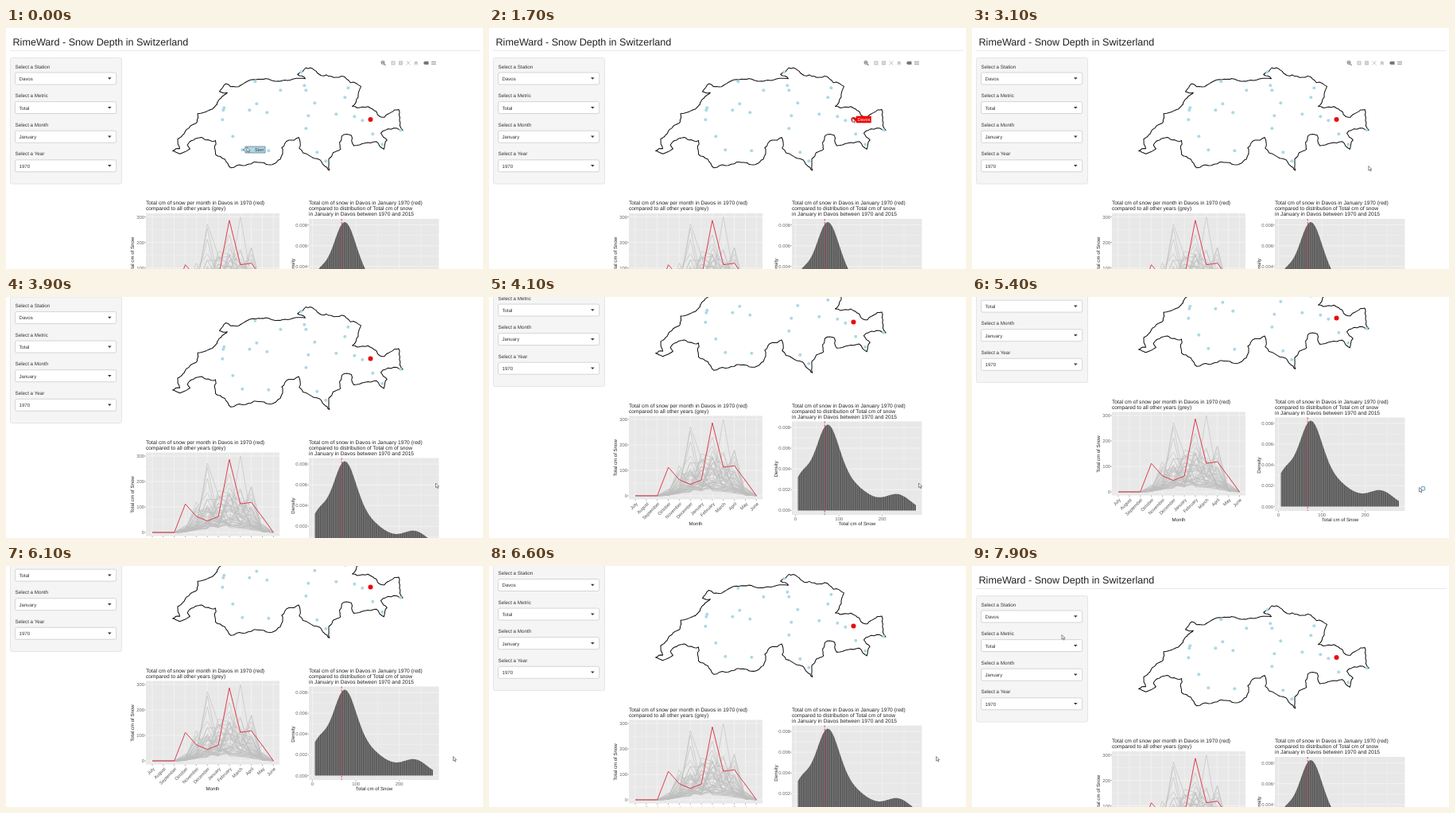
These frames come from a looping animation (600 by 303 pixels, 8 s). An HTML page:

```html
<!DOCTYPE html>
<html lang="en">
<head>
<meta charset="utf-8">
<title>Snow depth dashboard</title>
<style>
html, body { margin: 0; width: 100%; height: 100%; overflow: hidden; background: #fff; }
svg {
  display: block; width: 100vw; height: 100vh;
  font-family: "Liberation Sans", Arial, sans-serif; text-rendering: geometricPrecision;
}
</style>
</head>
<body>
<svg id="stage" viewBox="0 0 600 303">
  <defs>
    <pattern id="bars" width="2.7" height="10" patternUnits="userSpaceOnUse">
      <rect width="2.7" height="10" fill="#5b5b5b"/>
      <rect width=".7" height="10" fill="#858585"/>
    </pattern>
    <clipPath id="leftPanel"><rect x="176" y="233" width="168" height="105"/></clipPath>
  </defs>
  <g id="page"></g>
  <g id="cursor">
    <path d="M0 0V5.6L1.4 4.4 2.4 6.6 3.3 6.2 2.4 4.1H4.1Z" fill="#fff" stroke="#444" stroke-width=".6"/>
    <circle id="busy" cx="4.8" cy="1.2" r="2.4" fill="none" stroke="#6fa8c4" stroke-width="1.1"/>
  </g>
</svg>
<script>
const page = document.getElementById('page');
const cursor = document.getElementById('cursor');
const busy = document.getElementById('busy');

function add(tag, attrs, parent = page) {
  const el = document.createElementNS('http://www.w3.org/2000/svg', tag);
  for (const k in attrs) el.setAttribute(k, attrs[k]);
  parent.appendChild(el);
  return el;
}
const rect = (x, y, width, height, fill, more, parent) =>
  add('rect', { x, y, width, height, fill, ...more }, parent);
const path = (d, stroke, width, more, parent) =>
  add('path', { d, stroke, 'stroke-width': width, fill: 'none', ...more }, parent);
const circle = (cx, cy, r, fill) => add('circle', { cx, cy, r, fill });
function text(str, x, y, size, fill = '#222', more = {}, parent = page) {
  add('text', { x, y, 'font-size': size, fill, ...more }, parent).textContent = str;
}
const middle = { 'text-anchor': 'middle' }, end = { 'text-anchor': 'end' };
const upright = (str, x, y) =>
  text(str, 0, 0, 6.1, '#222', { ...middle, transform: `translate(${x} ${y}) rotate(-90)` });
const lines = (x, rows) => rows.forEach((row, i) => text(row, x, 222.2 + 7 * i, 6.68));

let seed = 7;
const random = () => (seed = seed * 16807 % 2147483647) / 2147483647;

// Header and sidebar
text('RimeWard - Snow Depth in Switzerland', 8.5, 21.5, 12.6, '#222');
path('M5 28.5H597', '#eaeaea', 1);
rect(5.5, 37.5, 140, 158.5, '#f5f5f5', { rx: 2, stroke: '#e0e0e0', 'stroke-width': .8 });
[['Station', 'Davos'], ['Metric', 'Total'], ['Month', 'January'], ['Year', '1970']].forEach(([name, value], i) => {
  const y = 36.6 * i;
  text('Select a ' + name, 11.5, 50.6 + y, 6.25, '#333');
  rect(11.5, 56 + y, 127.2, 15, '#fff', { rx: 2, stroke: '#ccc', 'stroke-width': .8 });
  text(value, 16.5, 65.9 + y, 6.1, '#333');
  add('path', { d: `M128 ${62.3 + y}h4.6l-2.3 2.5z`, fill: '#333' });
});

// Map: key border points (longitude, latitude), roughened between them
const border = `5.96 46.2,6.1 46.24,6.06 46.43,6.44 46.76,6.45 46.92,6.85 47.16,7.03 47.33,6.88 47.35,7 47.5,7.2 47.44,
  7.59 47.58,8.1 47.56,8.56 47.6,8.41 47.68,8.57 47.81,8.87 47.66,9.27 47.65,9.65 47.45,9.48 47.06,9.88 47.01,
  10.11 46.85,10.39 47,10.47 46.6,10.24 46.62,10.04 46.54,10.16 46.41,10.1 46.23,9.95 46.38,9.51 46.3,9.46 46.5,
  9.28 46.49,9.25 46.23,9.02 46.04,9.03 45.82,8.84 46.03,8.44 46.25,8.43 46.46,8.1 46.26,8.1 46.11,7.87 45.93,
  7.55 45.98,7.1 45.87,6.8 46.13,6.8 46.4,6.52 46.46,6.25 46.31,6.3 46.24,6.1 46.14`
  .split(',').map(p => p.trim().split(' ')).map(([lon, lat]) => [209.3 + (lon - 5.956) * 64.2, 179 - (lat - 45.82) * 64.8]);

function roughen(a, b) {
  const dx = b[0] - a[0], dy = b[1] - a[1];
  if (Math.hypot(dx, dy) < 4) return [a];
  const k = (random() - .5) * .3;
  const mid = [(a[0] + b[0]) / 2 - dy * k, (a[1] + b[1]) / 2 + dx * k];
  return [...roughen(a, mid), ...roughen(mid, b)];
}
const outline = border.flatMap((p, i) => roughen(p, border[(i + 1) % border.length]));
path('M' + outline.map(p => p.map(v => v.toFixed(1)).join(' ')).join('L') + 'Z', '#111', 1.05, { 'stroke-linejoin': 'round' });

const stations = `375 72,377 78,345 78,315 95,306 103,328 106,274 100,273 103,272 115,285 136,297 153,330 154,388 94,
  380 110,377 126,415 108,430 75,426 87,438 111,448 116,461 133,473 146,496 128,391 156,402 167,313 67,371 55`;
stations.split(',').forEach(p => circle(...p.trim().split(' ').map(v => +v + .3), 2, '#add8e6'));
circle(458.5, 115, 3, '#e80c0c');

function tooltip(x, y, w, label, fill, ink, edge, textX) {
  const g = add('g', {});
  add('path', { d: `M${x - 3} ${y}l3 -2v-2h${w}v8h${-w}v-2z`, fill, stroke: edge, 'stroke-width': .6 }, g);
  text(label, textX, y + 2.1, 5.7, ink, {}, g);
  return g;
}
const sionTip = tooltip(301, 153, 25, 'Sion', '#add8e6', '#333', '#456', 313);
const davosTip = tooltip(462, 115, 18.5, 'Davos', '#f00000', '#fff', '#f00000', 463.4);

// Map toolbar
const tools = add('g', {});
add('circle', { cx: 474, cy: 43.5, r: 1.9, fill: 'none', stroke: '#888', 'stroke-width': 1.2 }, tools);
path('M475.5 45l2 2M473 43.5h2', '#888', 1.1, {}, tools);
for (const x of [484.5, 494]) rect(x, 41.5, 5, 5, '#c4c4c4', {}, tools);
path('M485.5 44h3M487 42.5v3M495 44h3', '#fff', .8, {}, tools);
path('M503.5 41.5l5 5M508.5 41.5l-5 5', '#c4c4c4', .9, {}, tools);
add('path', { d: 'M513 44l2.8-2.7 2.8 2.7h-.8v2.6h-1.4v-1.8h-1.2v1.8h-1.4v-2.6z', fill: '#c4c4c4' }, tools);
add('path', { d: 'M525 44l1.5-2h5v4h-5z', fill: '#777' }, tools);
path('M535 42.6h6M535 45.3h6', '#b4b4b4', 1.7, {}, tools);

// Monthly line chart
const grid = (d, major) => path(d, '#f7f7f7', major ? .7 : .35);
const monthX = m => 184 + 13.85 * m;
const snowY = v => 333.5 - .32 * v;
const series = (values, color, width) =>
  path('M' + values.map((v, m) => `${monthX(m).toFixed(1)} ${snowY(v).toFixed(1)}`).join('L'), color, width,
    { 'clip-path': 'url(#leftPanel)', 'stroke-linejoin': 'round' });

lines(176, ['Total cm of snow per month in Davos in 1970 (red)', 'compared to all other years (grey)']);
rect(176, 233, 168, 105, '#e8e8e8');
for (let v = 0; v <= 300; v += 50) grid(`M176 ${snowY(v)}H344`, v % 100 == 0);
'July August September October November December January February March April May June'.split(' ').forEach((name, m) => {
  grid(`M${monthX(m)} 233V338`, true);
  path(`M${monthX(m)} 338v1.5`, '#555', .5);
  text(name, 0, 0, 5.7, '#4d4d4d', { ...end, transform: `translate(${monthX(m) + 3.2} 344) rotate(-45)` });
});
for (let v = 0; v <= 300; v += 100) {
  text(v, 174, snowY(v) + 2, 5.9, '#666', end);
  path(`M174.5 ${snowY(v)}H176`, '#555', .5);
}
// Winter bell over the months with a long-tailed spread between years
const typical = m => 105 * Math.exp(-(((m - 6.6) / 2.9) ** 4));
for (let year = 0; year < 45; year++) {
  const values = Array.from({ length: 12 }, (_, m) => Math.min(300, typical(m) * (.15 - .58 * Math.log(random()))));
  series(values, '#bebebe', .6);
}
series([0, 0, 0, 112, 63, 45, 62, 287, 112, 118, 60, 0], '#dc3545', .95);
upright('Total cm of Snow', 161, 286);
text('Month', 260, 370.2, 6.1, '#222', middle);

// Density chart: a sum of bells
lines(381, ['Total cm of snow in Davos in January 1970 (red)', 'compared to distribution of Total cm of snow',
  'in January in Davos between 1970 and 2015']);
rect(381, 240, 163.5, 117.5, '#e8e8e8');
for (let i = 0; i <= 8; i++) {
  const y = 352 - 13.06 * i, major = i % 2 == 0;
  grid(`M381 ${y}H544.5`, major);
  if (!major) continue;
  path(`M379.5 ${y}h1.5`, '#555', .5);
  text((i / 1000).toFixed(3), 379, y + 2, 5.9, '#666', end);
}
for (let i = 0; i <= 5; i++) {
  const x = 385.5 + 27.3 * i, major = i % 2 == 0;
  grid(`M${x} 240V357.5`, major);
  if (!major) continue;
  path(`M${x} 357.5v1.5`, '#555', .5);
  text(i * 50, x, 364.6, 5.9, '#666', middle);
}
const bell = (x, height, center, width) => height * Math.exp(-(((x - center) / width) ** 2));
const density = x => bell(x, 71.5, 425, 20) + bell(x, 40, 440, 45) + bell(x, 30, 392, 16) + bell(x, 18, 515, 22);
let hill = 'M388.5 352';
for (let x = 388.5; x <= 537; x += 1.5) hill += `L${x} ${(352 - density(x)).toFixed(1)}`;
add('path', { d: hill + 'V352Z', fill: 'url(#bars)' });
path('M422.2 240V357.5', '#e0344c', .9, { 'stroke-dasharray': '2.4 1.6' });
upright('Density', 362.5, 300);
text('Total cm of Snow', 463, 370.2, 6.1, '#222', middle);

// Motion
function ease(t, from, to) {
  const p = Math.min(1, Math.max(0, (t - from) / (to - from)));
  return p * p * (3 - 2 * p);
}
const moves = [ // start, end, x, y
  [200, 900, 457, 113], [2700, 3500, 540.5, 234], [4500, 5000, 562.5, 239.5], [7000, 7800, 113, 86.5]
];
const cursorAt = t => moves.reduce(([x, y], [from, to, nx, ny]) => {
  const p = ease(t, from, to);
  return [x + (nx - x) * p, y + (ny - y) * p];
}, [303, 150]);
const scrollAt = t => 88.5 * (ease(t, 3680, 4170) - ease(t, 6300, 6860));
const show = (el, on) => el.setAttribute('visibility', on ? 'visible' : 'hidden');

function draw(now) {
  const t = Math.floor(now % 8000 / 100) * 100;
  const scroll = scrollAt(t), [x, y] = cursorAt(t);
  page.setAttribute('transform', `translate(0 ${-scroll})`);
  cursor.setAttribute('transform', `translate(${x} ${y})`);
  show(sionTip, t < 300);
  show(davosTip, t >= 1000 && t < 2800);
  show(tools, x > 155 && y + scroll < 210);
  show(busy, t >= 4700 && t < 6100);
}
const start = performance.now();
function frame() {
  draw(performance.now() - start);
  requestAnimationFrame(frame);
}
frame();
</script>
</body>
</html>
```
